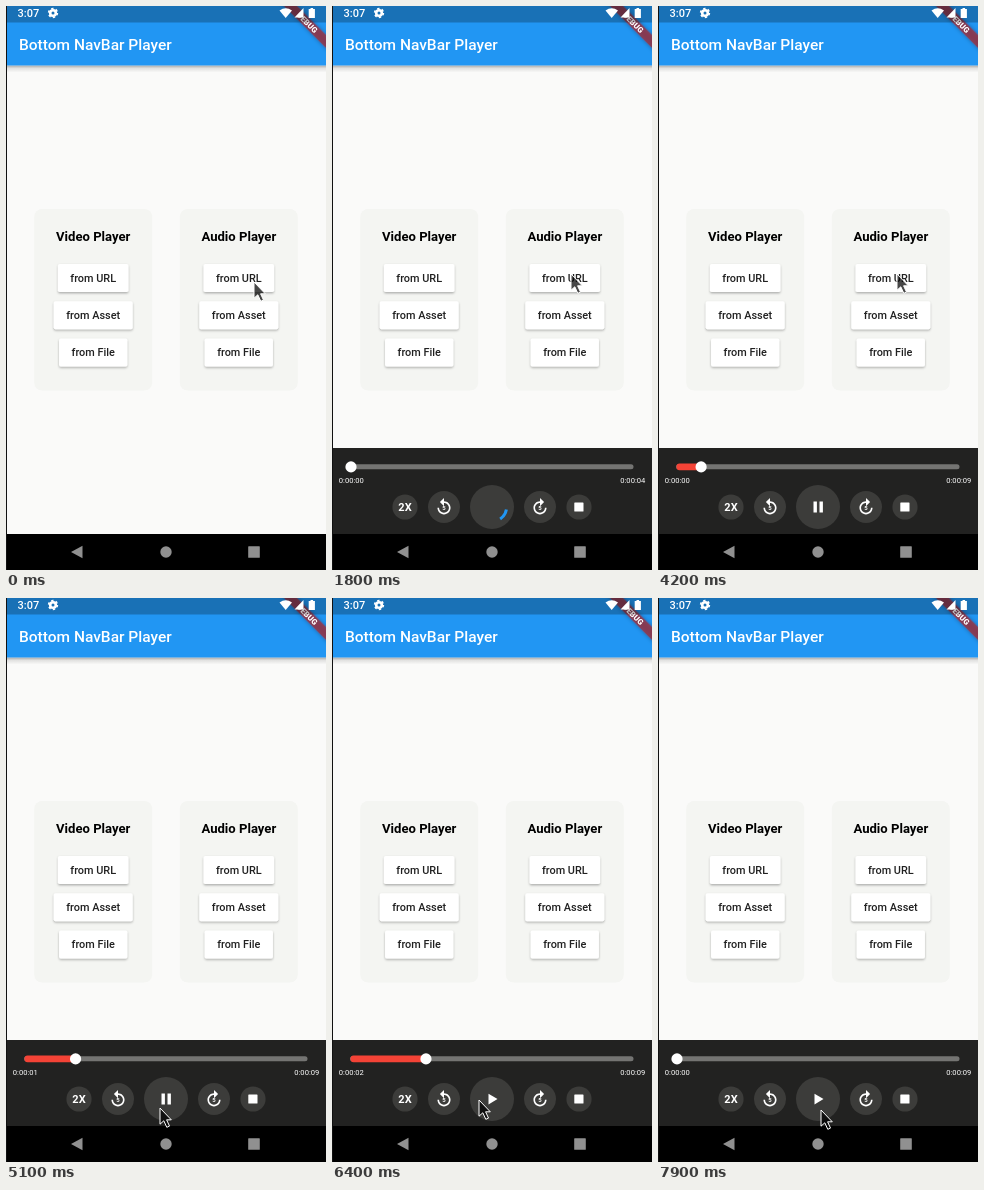
These frames come from a looping animation (320x564 px, 8000 ms). An HTML page:

```html
<!DOCTYPE html>
<html lang="en">
<head>
<meta charset="utf-8">
<title>Bottom NavBar Player</title>
<style>
  html, body { margin: 0; width: 100%; height: 100%; overflow: hidden; background: #fafaf9; }
  svg { display: block; width: 100vw; height: 100vh; }
  text { font-family: Roboto, sans-serif; }
  .mid { text-anchor: middle; }
  .white { fill: #fff; }
  .medium { font-weight: 500; }
  .bold { font-weight: 700; }
  .label { font-size: 10.9px; fill: #212121; }
  .time { font-size: 7.6px; fill: #fff; }
  .disc { fill: #3c3c3a; }
  .nav { fill: #909090; }
</style>
</head>
<body>
<svg viewBox="0 0 320 564">
  <defs>
    <linearGradient id="barShadow" x2="0" y2="1">
      <stop offset="0" stop-color="#000" stop-opacity=".32"/>
      <stop offset=".4" stop-color="#000" stop-opacity=".1"/>
      <stop offset="1" stop-color="#000" stop-opacity="0"/>
    </linearGradient>
    <filter id="lift" x="-10%" y="-20%" width="120%" height="150%">
      <feDropShadow dx="0" dy="1.3" stdDeviation="1" flood-opacity=".3"/>
    </filter>
    <filter id="glow" x="-20%" y="-80%" width="140%" height="260%">
      <feDropShadow dx="0" dy="0" stdDeviation="2" flood-opacity=".5"/>
    </filter>
    <path id="turn" d="M12 5V1L7 6l5 5V7c3.31 0 6 2.69 6 6s-2.69 6-6 6-6-2.69-6-6H4c0 4.42 3.58 8 8 8s8-3.58 8-8-3.58-8-8-8z"/>
  </defs>

  <rect width="320" height="564" fill="#fafaf9"/>
  <g id="cards"></g>

  <rect y="59.5" width="320" height="7" fill="url(#barShadow)"/>
  <rect width="320" height="59.5" fill="#2196f3"/>
  <text class="white medium" x="13" y="44.3" font-size="15.5">Bottom NavBar Player</text>

  <g transform="translate(320 -2) rotate(45)">
    <rect x="-40" y="21.8" width="80" height="9.3" fill="#b71c1c" fill-opacity=".63" filter="url(#glow)"/>
    <text class="white mid" y="29.3" font-size="7.9" font-weight="900">DEBUG</text>
  </g>
  <rect width="320" height="16.5" fill="#000" fill-opacity=".25"/>

  <g class="white">
    <text class="medium" x="11.5" y="11.4" font-size="11">3:07</text>
    <circle cx="47" cy="7" r="2.8" fill="none" stroke="#fff" stroke-width="2.6"/>
    <circle cx="47" cy="7" r="4.4" fill="none" stroke="#fff" stroke-width="1.6" stroke-dasharray="2.3 2.307"/>
    <path d="M273.5 4.6Q279.700 -.2 286 4.6L279.700 12Z"/>
    <path d="M297.500 2V11.500H288.500Z"/>
    <path d="M302.700 3h1.800V2h2.600v1h1.800v9h-6.200z"/>
  </g>

  <g id="panel">
    <rect y="442" width="320" height="87" fill="#222221"/>
    <rect x="18" y="458.300" width="283.500" height="5" rx="2.500" fill="#747472"/>
    <rect id="played" x="18.500" y="457.500" height="6.800" rx="3" fill="#f44336"/>
    <circle id="thumb" class="white" cy="460.900" r="5.600"/>
    <text id="position" class="time" x="6.800" y="477"></text>
    <text id="duration" class="time" x="313.300" y="477" text-anchor="end"></text>

    <circle class="disc" cx="73" cy="501" r="12.600"/>
    <text class="white bold mid" x="73" y="505" font-size="11">2X</text>

    <circle class="disc" cx="112" cy="501" r="16"/>
    <use href="#turn" class="white" transform="translate(112 501) scale(.82) translate(-12 -12)"/>
    <text class="white bold mid" x="112" y="504.100" font-size="6">5</text>

    <circle class="disc" cx="160" cy="501" r="22"/>
    <path id="pause" class="white" d="M155.500 495.500h3.400v11h-3.400zM161.500 495.500h3.400v11h-3.400z"/>
    <path id="play" class="white" d="M156.500 495.800L165.500 501L156.500 506.500Z"/>
    <path id="spinner" fill="none" stroke="#2196f3" stroke-width="3"/>

    <circle class="disc" cx="208" cy="501" r="16"/>
    <use href="#turn" class="white" transform="translate(208 501) scale(-.82 .82) translate(-12 -12)"/>
    <text class="white bold mid" x="208" y="504.100" font-size="6">5</text>

    <circle class="disc" cx="247" cy="501" r="12.600"/>
    <rect class="white" x="242.300" y="496.400" width="9.200" height="9.200" rx=".6"/>
  </g>

  <rect y="528" width="320" height="36"/>
  <path class="nav" d="M65 546L76.500 539.700V552.300Z"/>
  <circle class="nav" cx="160" cy="546" r="5.700"/>
  <rect class="nav" x="242.200" y="540.200" width="11.600" height="11.600" rx=".6"/>
  <rect width="1" height="564" fill="#111"/>

  <path id="cursor" d="M0 0V16.200L3.800 12.800L6.800 19.300L9.500 18.100L6.600 11.800H11.300Z"
        fill="#000" fill-opacity=".72" stroke="#fff" stroke-width="1" stroke-linejoin="round"/>
</svg>
<script>
const LOOP = 8000, STEP = 100;
const START = 3380, PAUSED = 5930, REWIND = 6900;
const PX_PER_MS = 0.0294;
const $ = id => document.getElementById(id);

// time, x, y of the pointer tip
const POINTER = [
  [0, 248, 276], [100, 239, 269], [500, 239, 269], [600, 239, 268],
  [4300, 239, 268], [4500, 222, 335], [4700, 186, 455], [4900, 158, 524],
  [5000, 154, 518], [5100, 154, 510], [5200, 157, 504], [5400, 158, 503],
  [6300, 158, 503], [6400, 147, 502], [6500, 130, 501], [6600, 117, 500],
  [6700, 113, 500], [7200, 113, 500], [7400, 142, 507], [7600, 163, 512],
  [LOOP, 163, 512]
];

function card(cx, title) {
  const button = ([label, width, y]) => `
    <rect x="${cx - width / 2}" y="${y}" width="${width}" height="28" rx="1.8" fill="#fff" filter="url(#lift)"/>
    <text class="label medium mid" x="${cx}" y="${y + 17.8}">${label}</text>`;
  return `<rect x="${cx - 59}" y="203" width="118" height="181.500" rx="8" fill="#f4f5f2"/>
    <text class="bold mid" x="${cx}" y="235" font-size="13.1">${title}</text>` +
    [['from URL', 70.5, 258], ['from Asset', 79, 295.3], ['from File', 68.3, 332.5]].map(button).join('');
}
$('cards').innerHTML = card(87.2, 'Video Player') + card(232.8, 'Audio Player');

function pointerAt(t) {
  const i = POINTER.findIndex(p => p[0] > t);
  const [t0, x0, y0] = POINTER[i - 1], [t1, x1, y1] = POINTER[i];
  const k = (t - t0) / (t1 - t0);
  return [x0 + (x1 - x0) * k, y0 + (y1 - y0) * k];
}

// cubic-bezier(.4, 0, .2, 1)
function ease(x) {
  if (x <= 0) return 0;
  if (x >= 1) return 1;
  let lo = 0, hi = 1;
  for (let i = 0; i < 20; i++) {
    const s = (lo + hi) / 2, r = 1 - s;
    if (1.2 * r * r * s + 0.6 * r * s * s + s ** 3 < x) lo = s; else hi = s;
  }
  return 3 * (1 - lo) * lo * lo + lo ** 3;
}

// Material indeterminate progress ring
function ring(age) {
  const phase = age / 1333 % 1;
  const head = ease(phase * 2), tail = ease(phase * 2 - 1);
  const from = Math.PI * (-0.5 + tail * 1.5 + age / 1111 + phase * 0.5);
  const sweep = Math.max((head - tail) * 1.5 * Math.PI, 0.15);
  const point = a => `${160.2 + 14.4 * Math.cos(a)} ${501 + 14.4 * Math.sin(a)}`;
  return `M${point(from)}A14.4 14.4 0 ${sweep > Math.PI ? 1 : 0} 1 ${point(from + sweep)}`;
}

const show = (id, on) => $(id).setAttribute('display', on ? 'inline' : 'none');
const clock = s => '0:00:0' + s;

function draw(t) {
  const loading = t < 3300 || (t >= REWIND && t < 7900);
  const position = t < START || t >= REWIND ? 0 : Math.min(t, PAUSED) - START;
  const x = 19 + position * PX_PER_MS;

  show('panel', t >= 800);
  show('spinner', loading);
  show('pause', !loading && t < PAUSED);
  show('play', !loading && t >= PAUSED);
  if (loading && t >= 800) $('spinner').setAttribute('d', ring(t - (t < REWIND ? 770 : REWIND - 30)));

  $('played').setAttribute('width', position ? x - 18.5 : 0);
  $('thumb').setAttribute('cx', x);
  $('position').textContent = clock(Math.floor(position / 1000));
  $('duration').textContent = clock(t < 3300 ? 4 : 9);
  $('cursor').setAttribute('transform', `translate(${pointerAt(t)})`);
}

const begin = performance.now();
function tick() {
  const t = (performance.now() - begin) % LOOP;
  draw(Math.floor(t / STEP) * STEP);
  requestAnimationFrame(tick);
}
tick();
</script>
</body>
</html>
```
